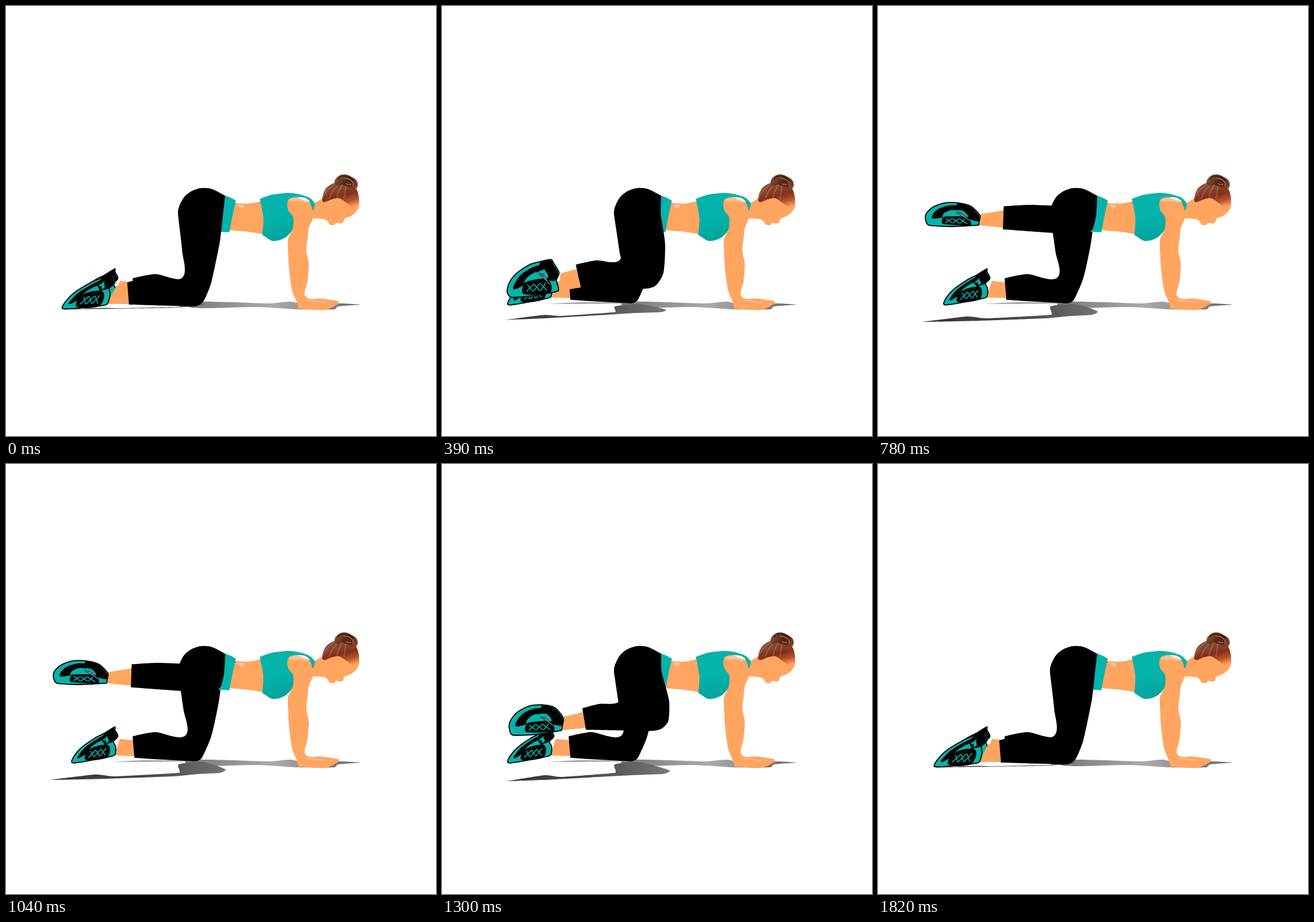
An HTML page with a canvas for the animation above (2.08 s loop, 720 by 720 pixels).

```html
<!DOCTYPE html>
<html lang="en">
<head>
<meta charset="utf-8">
<title>Kneeling leg lift</title>
<style>
html, body { margin: 0; width: 100%; height: 100%; overflow: hidden; background: #fff; }
canvas { display: block; width: 100vw; height: 100vh; }
</style>
</head>
<body>
<canvas id="stage" width="720" height="720"></canvas>
<script>
const ctx = document.getElementById('stage').getContext('2d');
const SKIN = '#ffa560', LIGHT = '#ffc298', TEAL = '#04b3aa', BLACK = '#000';
const STEP = 130, LOOP = 2080;

// "x,y" is a soft point, "x,y!" a sharp corner (the point is doubled)
const pts = s => s.split(' ').flatMap(w => {
  const p = w.replace('!', '').split(',').map(Number);
  return w.endsWith('!') ? [p, p] : [p];
});
const lerp = (a, b, t) => [a[0] + (b[0] - a[0]) * t, a[1] + (b[1] - a[1]) * t];
const move = ([x, y], dx, dy) => [x + dx, y + dy];
const blend = (a, b, t) => a.map((p, i) => lerp(p, b[i], t));

// leg: front, thigh, knee, shin, cuff, calf, back of knee; foot: toe, heel, sock; shade: tip, joint, knee
const pose = (leg, foot, shade, turn) => ({ leg: pts(leg), foot: pts(foot), shade: pts(shade), turn: [[turn, 0]] });
const KNEEL = pose('363,352 358,395 344,462 331,494 316,503 206,500! 203,463! 250,451 295,455 295,410',
  '94,505 181,444 168,500', '92,508 290,504 330,501', 0);
const LIFT = pose('365,352 367,400 363,462 350,492 333,500 226,504! 213,457! 255,450 299,453 296,405',
  '105,519 180,443 188,509', '105,520 290,508 369,504', 0);
const TUCK = pose('368,349 380,395 379,430 366,444 345,447 241,445! 235,409! 262,402 296,398 293,370',
  '112,450 185,406 200,446', '109,531 290,517 381,513', 1);
const STRETCH = pose('365,350 358,370 350,374 335,376 310,375 206,367! 208,328! 250,326 291,328 289,337',
  '76,355 148,326 165,359', '68,529 290,517 366,511', 1);
const FAR = pose('362,355 356,400 344,455 328,492 316,498 215,492! 212,456! 250,449 300,455 297,410',
  '110,499 182,440 181,488', '110,499 290,499 320,499', 0);
const PATH = [KNEEL, LIFT, TUCK, STRETCH];

const HIP = pts('288,345 297,322 311,310 328,305 346,307 367,318!');

// Shoe outlines in the frame spanned by toe-heel and toe-sock
const SIDE = pts('0,0 .23,-.16 .46,-.23 .7,-.18 .84,-.07 1,0 .88,.13 .65,.43 .49,.49 .3,.73 0,1 -.04,.57 -.05,.16');
const TURNED = pts('.2,-.16 .51,-.39 .84,-.53 1.07,-.49 1.09,-.27 1,0 .84,.23 .49,.63 .19,.86 .07,.95 0,1 -.12,.61 -.1,.15');
const LACES = pts('.36,.06 .4,.45 -.03,.87 0,.33');

function trace(q) {
  const n = q.length, at = i => q[(i + n) % n];
  const gap = (a, b) => Math.hypot(b[0] - a[0], b[1] - a[1]);
  const slope = i => {
    const a = at(i - 1), b = at(i), c = at(i + 1);
    const k = .3 * Math.min(gap(a, b), gap(b, c)) / (gap(a, c) || 1);
    return [(c[0] - a[0]) * k, (c[1] - a[1]) * k];
  };
  ctx.beginPath();
  ctx.moveTo(...q[0]);
  for (let i = 0; i < n; i++) {
    const [sx, sy] = slope(i), [ex, ey] = slope(i + 1);
    ctx.bezierCurveTo(...move(at(i), sx, sy), ...move(at(i + 1), -ex, -ey), ...at(i + 1));
  }
}
function blob(q, fill) {
  trace(typeof q === 'string' ? pts(q) : q);
  ctx.fillStyle = fill;
  ctx.fill();
}
function stroke(color, width) {
  ctx.strokeStyle = color;
  ctx.lineWidth = width;
  ctx.stroke();
}
function line(q, color, width) {
  ctx.beginPath();
  q.forEach(p => ctx.lineTo(...p));
  stroke(color, width);
}
function grad(x0, y0, x1, y1, ...colors) {
  const g = ctx.createLinearGradient(x0, y0, x1, y1);
  colors.forEach((c, i) => g.addColorStop(i / (colors.length - 1), c));
  return g;
}

function drawFloor([tip, joint, knee]) {
  blob('300,498 330,495 380,496 440,498 476,495 500,500 560,498 595,500! 556,503 550,508 490,508 420,504 330,506',
    grad(300, 0, 595, 0, '#777', '#aaa', '#666'));
  blob('178,499! 230,496 310,496! 310,498! 230,499', '#aaa');
  const w = .2 + .8 * (joint[1] - 504) / 13, along = t => lerp(tip, joint, t);
  blob([tip, tip, move(along(.35), 0, -5 * w), along(.5), joint, [289, 503], [330, 499], knee,
    move(knee, -10, 6 * w), [320, knee[1] + 8 * w], move(joint, -10, 6 * w), move(along(.4), 0, 3 * w)],
    grad(90, 0, 380, 0, '#3a3434', '#4b4545', '#777'));
}

function drawShoe([toe, heel, sock], turn) {
  const place = ([s, t]) => [0, 1].map(i => toe[i] + s * (heel[i] - toe[i]) + t * (sock[i] - toe[i]));
  const body = blend(SIDE, TURNED, turn).map(place), mid = place([.42, .24]);
  // Strip that follows part of the outline between two depths
  const strip = (from, to, near, far) => {
    const part = body.slice(from, to), inset = k => part.map(p => lerp(p, mid, k));
    blob([...inset(near), ...inset(far).reverse()], BLACK);
  };
  blob(body, TEAL);
  stroke(BLACK, 1.8);
  strip(0, 5, .22, .55);
  strip(4, 9, .04, .5);

  const [a, b, c, d] = LACES.map(place);
  const cell = (u, v) => lerp(lerp(a, b, u), lerp(d, c, u), v);
  blob([a, b, c, d], BLACK);
  for (let u = .1; u < .8; u += .28) {
    line([cell(u, .25), cell(u + .24, .8)], TEAL, 1.6);
    line([cell(u, .8), cell(u + .24, .25)], TEAL, 1.6);
  }
  const bow = [cell(.65, -.5), cell(.95, .1), cell(.8, -.4), cell(1.05, .4)];
  line(bow, BLACK, 2.6);
  if (turn > .4) line(bow, '#8a8a8a', 1.4);
  return place;
}

function drawLeg({ leg, foot, turn }) {
  const [low, top] = [leg[5], leg[7]];
  const [toe, heel, sock] = foot;
  const neck = [0, 1].map(i => toe[i] + .55 * (heel[i] - toe[i]) + .58 * (sock[i] - toe[i]));
  const ankle = [lerp(top, low, .18), lerp(top, low, .92), sock, neck];
  blob(ankle.flatMap(p => [p, p]), SKIN);
  drawShoe(foot, turn[0][0]);
  blob([...HIP, ...leg], BLACK);
}

function drawTorso() {
  blob('380,329! 405,331 430,326! 434,355 430,382! 405,378 370,375! 376,350', SKIN);
  blob('386,332! 399,333! 394,340', LIGHT);
  blob('366,317! 376,321 385,326! 380,348 377,363 374,379! 356,378! 350,340', TEAL);
}

function drawHead() {
  blob('506,331! 518,329 534,320 560,312 588,322 590,335 586,345 577,352 567,356 564,363 558,364 553,363 549,367 542,366 539,361 533,357 514,356 506,364!', SKIN);
  blob('531,328 531,315 537,304 548,297 562,294 578,298 587,307 591,322 588,341 572,331 558,322 545,324',
    grad(556, 295, 568, 340, '#8a533d', '#8f4c34', '#84311b', '#b5522a', SKIN));
  ctx.save();
  ctx.clip();
  for (let i = 0; i < 12; i++) {
    const x = 530 + i * 4;
    ctx.beginPath();
    ctx.moveTo(x, 322);
    ctx.quadraticCurveTo(x + 3, 307, 560 + i, 294);
    stroke(i % 3 ? 'rgba(70,25,15,.22)' : 'rgba(215,150,115,.35)', 1.4);
  }
  ctx.restore();
  blob('552,301 551,291 560,283 572,283 586,291 589,300 584,307 563,299',
    grad(555, 284, 586, 306, '#8c5039', '#4f2418', '#8a452f'));
  for (let i = 0; i < 4; i++) {
    ctx.beginPath();
    ctx.ellipse(570 + i, 294 + i, 14 - i * 3, 8 - i * 2, .4, 3 + i, 5.5 + i);
    stroke(i % 2 ? '#a9664a' : '#3b170f', 1.6);
  }
}

function drawTopAndArm() {
  blob('425,323! 445,316 472,313 490,315 508,321 517,331 514,342! 482,352! 481,372 470,386 458,392 445,393 429,383! 431,355',
    grad(440, 315, 458, 394, TEAL, TEAL, '#02a39b'));
  blob('471,331 474,323 484,320 496,321 508,328 513,342 513,357 507,372 505,390 503,410 507,432 505,460 502,487 530,490 556,494 556,499 534,509 490,507! 486,494 479,476 474,440 472,392 480,373 481,354 473,343', SKIN);
  blob('474,326 484,321 500,323 508,329 490,327', LIGHT);
  blob('488,320! 500,321 509,327! 499,325', '#f3fffb');
  line(pts('503,493 520,494 534,497'), LIGHT, 1.5);
}

function draw(p) {
  const i = Math.min(Math.floor(p), PATH.length - 2), now = {};
  for (const part in KNEEL) now[part] = blend(PATH[i][part], PATH[i + 1][part], p - i);
  ctx.fillStyle = '#fff';
  ctx.fillRect(0, 0, 720, 720);
  ctx.lineJoin = ctx.lineCap = 'round';
  drawFloor(now.shade);
  drawLeg(FAR);
  drawTorso();
  drawHead();
  drawTopAndArm();
  drawLeg(now);
}

// Path position per step: steady lift, short hold at the top, slower settling at the end
function position(step) {
  if (step <= 4) return step / 2;
  if (step <= 10) return 2 + Math.min(1, Math.sin((step - 4) / 6 * Math.PI) * 1.05);
  return 2 * Math.max(0, (14 - step) / 4) ** 2;
}

function tick() {
  draw(position(Math.floor(performance.now() % LOOP / STEP)));
  requestAnimationFrame(tick);
}
tick();
</script>
</body>
</html>
```
